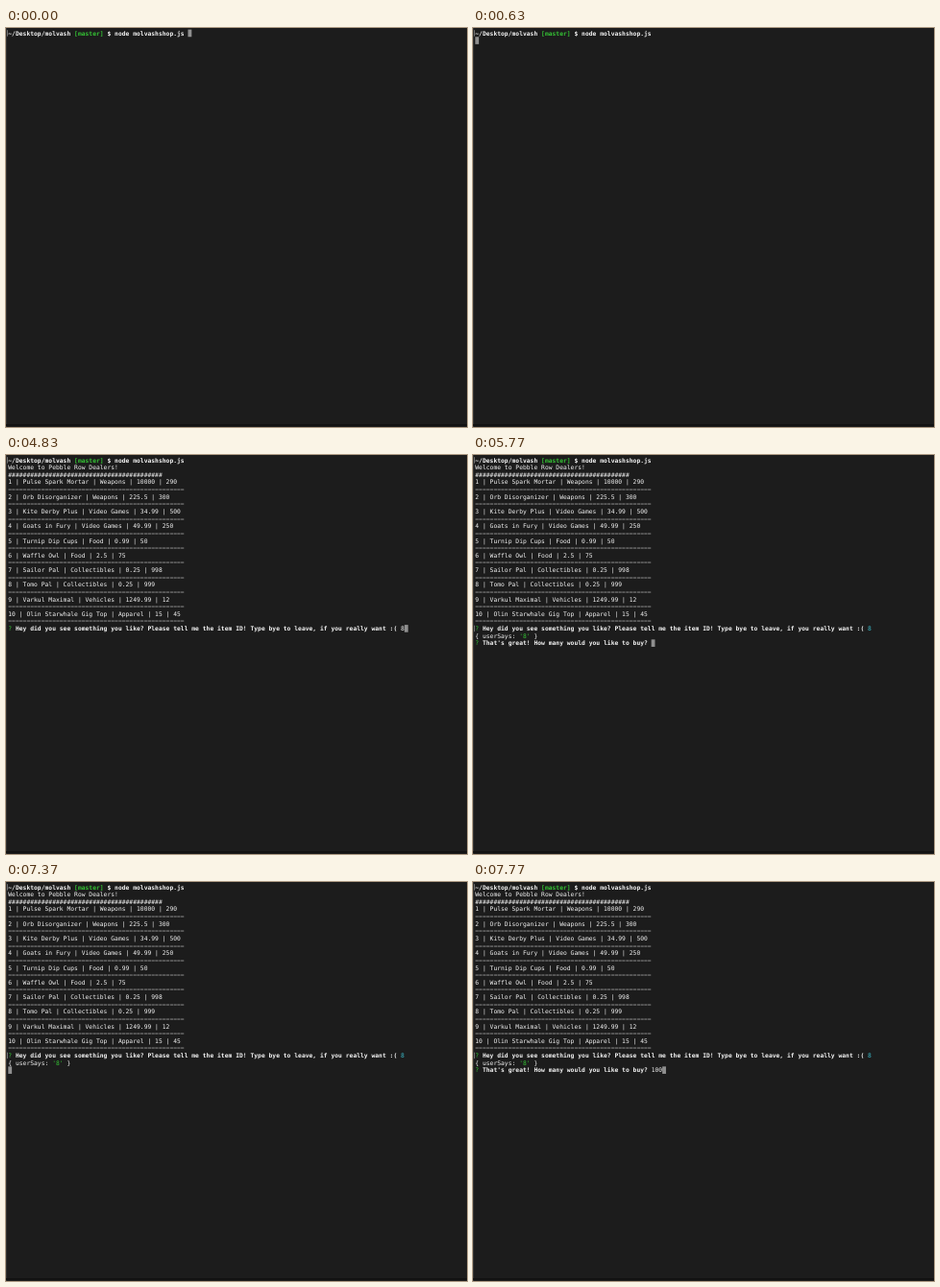
An HTML page with a canvas for the animation above (8000 ms loop, 480 by 416 pixels).

```html
<!DOCTYPE html>
<html lang="en">
<head>
<meta charset="utf-8">
<title>Terminal shop</title>
<style>
  html, body { margin: 0; width: 100%; height: 100%; overflow: hidden; background: #1c1c1c; }
  canvas { display: block; }
</style>
</head>
<body>
<canvas id="stage" width="480" height="416"></canvas>
<script>
const ctx = document.getElementById('stage').getContext('2d');
const LOOP = 8000, LEFT = 2.3, TOP = 1.6, CELL = 3.82, LINE = 7.63;
const WHITE = '#f4f4f4', GREEN = '#35c435', CYAN = '#3bbccb', GREY = '#8f8f8f';

const items = [
  'Pulse Spark Mortar | Weapons | 10000 | 290',
  'Orb Disorganizer | Weapons | 225.5 | 300',
  'Kite Derby Plus | Video Games | 34.99 | 500',
  'Goats in Fury | Video Games | 49.99 | 250',
  'Turnip Dip Cups | Food | 0.99 | 50',
  'Waffle Owl | Food | 2.5 | 75',
  'Sailor Pal | Collectibles | 0.25 | 998',
  'Tomo Pal | Collectibles | 0.25 | 999',
  'Varkul Maximal | Vehicles | 1249.99 | 12',
  'Olin Starwhale Gig Top | Apparel | 15 | 45'
];
const askItem = 'Hey did you see something you like? Please tell me the item ID! ' +
  'Type bye to leave, if you really want :( ';
const askCount = "That's great! How many would you like to buy? ";

// Places each glyph on the terminal grid and returns the next free column.
function write(row, col, text, color = WHITE, bold = false) {
  ctx.font = `${bold ? 'bold ' : ''}6.3px "DejaVu Sans Mono", monospace`;
  ctx.fillStyle = color;
  for (const ch of text) {
    if (ch !== ' ') ctx.fillText(ch, LEFT + col * CELL, TOP + row * LINE + 6);
    col++;
  }
  return col;
}

function cursor(row, col) {
  ctx.fillStyle = GREY;
  ctx.fillRect(LEFT + col * CELL, TOP + row * LINE, CELL, LINE);
}

function mark(row) {
  ctx.fillStyle = '#858585';
  ctx.fillRect(1, TOP + row * LINE + 0.6, 0.8, LINE - 1.2);
}

function ask(row, question, answer, color) {
  write(row, 0, '?', GREEN);
  return write(row, write(row, 2, question, WHITE, true), answer, color);
}

function shell() {
  mark(0);
  let col = write(0, 0, '~/Desktop/molvash ', WHITE, true);
  col = write(0, col, '[master] ', GREEN, true);
  return write(0, col, '$ node molvashshop.js ', WHITE, true);
}

function catalogue() {
  write(1, 0, 'Welcome to Pebble Row Dealers!');
  write(2, 0, '#'.repeat(42));
  items.forEach((item, i) => {
    write(3 + 2 * i, 0, `${i + 1} | ${item}`);
    write(4 + 2 * i, 0, '\u2212'.repeat(48));
  });
}

function draw(t) {
  ctx.fillStyle = '#1c1c1c';
  ctx.fillRect(0, 0, 480, 416);
  ctx.fillStyle = '#303030';
  ctx.fillRect(0, 0, 1, 416);
  ctx.fillStyle = '#121212';
  ctx.fillRect(0, 413, 480, 2);

  const promptEnd = shell();
  if (t < 500) return cursor(0, promptEnd);
  if (t < 1100) return cursor(1, 0);

  catalogue();
  const sent = t >= 5770;
  const itemEnd = ask(23, askItem, t < 4830 ? '' : '8', sent ? CYAN : WHITE);
  if (!sent) return cursor(23, itemEnd);

  mark(23);
  write(24, 0, '{ userSays:     }');
  write(24, 12, "'8'", GREEN);
  if (t >= 7370 && t < 7430) return cursor(25, 0);
  const typed = [7430, 7570, 7770].filter(at => t >= at).length;
  cursor(25, ask(25, askCount, '100'.slice(0, typed)));
}

ctx.textRendering = 'geometricPrecision';
function tick() {
  draw(performance.now() % LOOP);
  requestAnimationFrame(tick);
}
tick();
</script>
</body>
</html>
```
